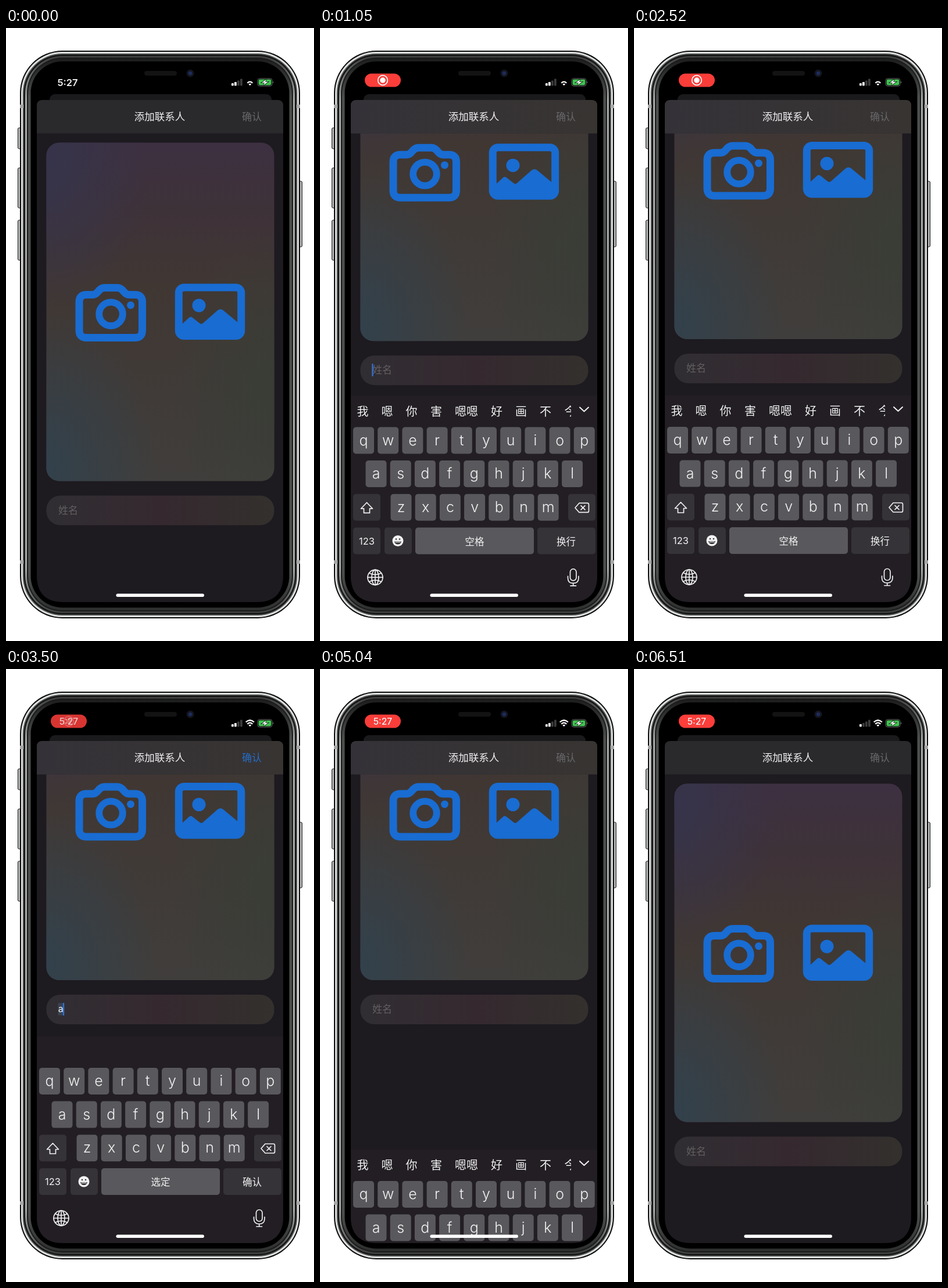
Write an HTML page that moves like this. It is 530 by 1056 pixels and loops after 6.58 s.

```html
<!DOCTYPE html>
<html lang="zh-CN">
<head>
<meta charset="utf-8">
<title>添加联系人</title>
<style>
html, body { margin: 0; width: 100%; height: 100%; overflow: hidden; background: #fff; }
svg { display: block; width: 530px; height: 1056px; }
text { font-family: Inter, "Noto Sans CJK SC", "Noto Sans CJK", sans-serif; fill: #f2f2f3; }
.line { fill: none; stroke: #f0f0f1; stroke-linecap: round; stroke-linejoin: round; }
.blue { fill: none; stroke: #196cd2; stroke-width: 13; stroke-linejoin: round; }
</style>
</head>
<body>
<svg viewBox="0 0 530 1056">
  <defs>
    <linearGradient id="steel" x2="0" y2="1">
      <stop offset="0" stop-color="#3a3c3b"/><stop offset=".08" stop-color="#a9acaa"/>
      <stop offset=".92" stop-color="#a9acaa"/><stop offset="1" stop-color="#3a3c3b"/>
    </linearGradient>
    <linearGradient id="rim" x2="0" y2="1">
      <stop offset="0" stop-color="#1c1d1d"/><stop offset=".07" stop-color="#4c4f4d"/>
      <stop offset=".93" stop-color="#4c4f4d"/><stop offset="1" stop-color="#2d2f2e"/>
    </linearGradient>
    <linearGradient id="base" x2="0" y2="1">
      <stop offset="0" stop-color="#3d3041"/><stop offset=".2" stop-color="#3e3239"/>
      <stop offset=".42" stop-color="#403733"/><stop offset="1" stop-color="#403e3c"/>
    </linearGradient>
    <radialGradient id="violet" cx="0" cy=".06" r=".45">
      <stop offset="0" stop-color="#36344b"/><stop offset="1" stop-color="#36344b" stop-opacity="0"/>
    </radialGradient>
    <radialGradient id="teal" cx="0" cy=".96" r=".48">
      <stop offset="0" stop-color="#32414c"/><stop offset="1" stop-color="#32414c" stop-opacity="0"/>
    </radialGradient>
    <radialGradient id="moss" cx="1" cy=".72" r=".45">
      <stop offset="0" stop-color="#393d36"/><stop offset="1" stop-color="#393d36" stop-opacity="0"/>
    </radialGradient>
    <linearGradient id="field">
      <stop offset="0" stop-color="#302e33"/><stop offset=".5" stop-color="#35292f"/>
      <stop offset="1" stop-color="#33302d"/>
    </linearGradient>
    <linearGradient id="tint">
      <stop offset="0" stop-color="#343238"/><stop offset="1" stop-color="#383432"/>
    </linearGradient>
    <clipPath id="screen"><path d="M53 58H477V943Q477 989 431 989H99Q53 989 53 943Z"/></clipPath>
    <clipPath id="sheet"><rect x="53" y="150" width="424" height="840"/></clipPath>
    <clipPath id="words"><rect x="53" y="633" width="379" height="54"/></clipPath>
  </defs>

  <g id="phone"></g>

  <g clip-path="url(#screen)">
    <rect x="75" y="114" width="382" height="30" rx="9" fill="#1a1a1c"/>
    <path d="M53 134Q53 124 63 124H467Q477 124 477 134V989H53Z" fill="#1d1a20"/>
    <g clip-path="url(#sheet)"><g id="content">
      <g id="card"></g>
      <path class="blue" d="M138.500 459.500H149Q154 459.500 158 454.500Q163 447.500 170 447.500H191Q198 447.500 203 454.500Q207 459.500 212 459.500H222Q234.500 459.500 234.500 472V521Q234.500 533.500 222 533.500H138.500Q126 533.500 126 521V472Q126 459.500 138.500 459.500Z"/>
      <circle class="blue" cx="180.500" cy="492.700" r="20.300" style="stroke-width:11.800"/>
      <circle cx="214.500" cy="477.500" r="6.500" fill="#196cd2"/>
      <rect class="blue" x="297.300" y="447" width="107.400" height="83.500" rx="9"/>
      <circle cx="332" cy="478" r="11.500" fill="#196cd2"/>
      <path d="M302 511L315 499Q318 496.500 321 499L333 508.500Q336 511 339 508.500L364 486.500Q369 482.500 374 486.500L401 509V532H302Z" fill="#196cd2"/>
      <rect x="69.500" y="805.500" width="392" height="51" rx="24" fill="url(#field)"/>
      <g id="hint"></g>
      <g id="typed"><rect x="89.500" y="820" width="9.500" height="21" fill="#3b4350"/></g>
      <rect id="caret" y="819.500" width="2.200" height="22" rx="1" fill="#2b74e0"/>
    </g></g>
    <path d="M53 134Q53 124 63 124H467Q477 124 477 134V181.500H53Z" fill="#2a292c"/>
    <path id="shade" d="M53 134Q53 124 63 124H467Q477 124 477 134V181.500H53Z" fill="url(#tint)"/>
    <g id="title"></g>
    <g id="keyboard"></g>
    <rect x="189.500" y="974.500" width="151.500" height="5.500" rx="2.700" fill="#fff"/>
  </g>

  <rect x="238" y="74" width="56" height="8" rx="4" fill="#131313"/>
  <circle cx="317" cy="78" r="6.500" fill="#14161f"/><circle cx="317" cy="78" r="3.200" fill="#1d2c5c"/>
  <g id="clock"></g>
  <g id="pill">
    <rect id="red" x="77" y="78.500" width="62" height="23" rx="11.500" fill="#ff3f3b"/>
    <g id="rec"><circle cx="108" cy="90" r="8.300" fill="none" stroke="#fff" stroke-width="1.700"/><circle cx="108" cy="90" r="4.700" fill="#fff"/></g>
    <g id="pillTime"></g>
  </g>
  <g id="bars"></g>
  <g fill="none" stroke="#fff" stroke-width="2.200">
    <path id="arc" d="M412.700 91.500Q419.800 85 426.900 91.500"/>
    <path d="M415.300 94.700Q419.800 90.600 424.300 94.700"/>
    <path d="M417.300 96.600Q419.800 94.800 422.300 96.600L419.800 99.300Z" fill="#fff" stroke="none"/>
  </g>
  <rect x="433" y="87" width="25" height="13" rx="3.800" fill="none" stroke="#6b6b6d"/>
  <rect x="434.600" y="88.600" width="21.800" height="9.800" rx="2.400" fill="#41c552"/>
  <path d="M459.200 91.500Q461.500 93.500 459.200 95.500Z" fill="#777"/>
  <path d="M448 88.500L440 94.300H445L443 98.500L451 92.700H446Z" fill="#fff" stroke="#0c2410" stroke-width="1.600" paint-order="stroke"/>
</svg>
<script>
const $ = id => document.getElementById(id);
const add = (id, markup) => { $(id).innerHTML += markup; };
const rect = (x, y, w, h, r, fill, more = '') =>
  `<rect x="${x}" y="${y}" width="${w}" height="${h}" rx="${r}" fill="${fill}" ${more}/>`;
const text = (s, x, y, size, more = '') =>
  `<text x="${x}" y="${y}" dy=".37em" font-size="${size}" text-anchor="middle" ${more}>${s}</text>`;

// Phone body: side buttons, nested rims, antenna bands
for (const [x, y, h] of [[20.5, 172, 36], [20.5, 241, 69], [20.5, 331, 69], [503.5, 264, 113]])
  add('phone', rect(x, y, 6, h, 2, '#b4b7b5', 'stroke="#111"'));
const rims = [[0, '#0a0a0a'], [2, '#dcdfdd'], [5, '#4a4c4b'], [7, '#0e0e0e'],
  [9, 'url(#steel)'], [12, '#1a1a1a'], [14, 'url(#rim)'], [18.5, '#000']];
for (const [d, fill] of rims)
  add('phone', rect(24 + d, 39 + d, 482 - 2 * d, 978 - 2 * d, 73 - d, fill));
for (const y of [132, 917])
  for (const x of [24, 500]) add('phone', rect(x, y, 6, 6, 0, '#a4a7a5'));

for (const fill of ['base', 'violet', 'teal', 'moss'])
  add('card', rect(69.5, 197.5, 392, 583, 22, `url(#${fill})`));
add('hint', text('姓名', 107, 830.5, 17, 'style="fill:#625f61"'));
add('typed', text('a', 94.3, 830, 16));
add('title', text('添加联系人', 264.5, 152.5, 17.5, 'font-weight="500"') +
  text('确认', 423, 152.5, 17, 'id="done"'));
add('clock', text('5:27', 106, 94, 16.5, 'font-weight="600"'));
add('pillTime', text('5:27', 108, 90, 15.5, 'font-weight="500"'));
[4.5, 6.5, 9, 12].forEach((h, i) =>
  add('bars', rect(388 + i * 5, 99.5 - h, 3.8, h, 1, i < 2 ? '#fff' : '#3c3c3e', `id="bar${i}"`)));

// Keyboard at rest
const light = '#59585c', dark = '#353337';
const key = (x, y, w, fill, id = '') => rect(x, y, w, 46, 5, fill, id && `id="${id}"`);
let board = rect(53, 633, 424, 360, 0, '#221e23');
const words = [['我', 73.5], ['嗯', 115.5], ['你', 157.5], ['害', 200], ['嗯嗯', 252],
  ['好', 304], ['画', 346], ['不', 388], ['今', 430.5]];
board += '<g id="bar"><g clip-path="url(#words)">' +
  words.map(([s, x]) => text(s, x, 660, 20)).join('') +
  '</g><path class="line" stroke-width="2" d="M447 653L454.500 660L462 653"/></g>';
[['qwertyuiop', 57], ['asdfghjkl', 78.5], ['zxcvbnm', 121.5]].forEach(([row, x0], r) =>
  [...row].forEach((c, i) => {
    const x = x0 + i * 42.2, y = 687 + r * 57.6;
    board += key(x, y, 36, light) + text(c, x + 18, y + 22, 25, 'font-weight="300"');
  }));
board += key(57, 802.2, 47, dark) + key(427, 802.2, 47, dark) +
  key(57, 860, 47, dark) + key(111, 860, 47, dark) +
  key(164, 860, 204, light) + key(374, 860, 100, dark, 'enter') +
  text('123', 80.5, 883, 16.5) + text('空格', 266, 884, 16.5, 'id="space"') +
  text('换行', 423.5, 884, 16.5, 'id="enterText"') +
  `<g class="line" stroke-width="1.700">
    <path d="M80.500 817L90.500 827.500H85.500V835H75.500V827.500H70.500Z"/>
    <path d="M446 818H460Q462.500 818 462.500 820.500V831.500Q462.500 834 460 834H446L439 826ZM449 822.500L456 829.500M456 822.500L449 829.500"/>
    <circle cx="95" cy="946" r="13"/><ellipse cx="95" cy="946" rx="6" ry="13"/>
    <path d="M95 933V959M82 946H108M84.500 938.500Q95 944 105.500 938.500M84.500 953.500Q95 948 105.500 953.500"/>
    <rect x="430.500" y="931.500" width="10.500" height="20" rx="5.200"/>
    <path d="M426.500 944V947Q426.500 956 435.700 956Q445 956 445 947V944M435.700 956V960.500M431 960.500H440.500"/>
  </g>
  <circle cx="134" cy="883" r="9.500" fill="#f2f2f3"/>
  <path d="M128 884H140Q139 889 134 889Q129 889 128 884Z" fill="${dark}"/>
  <path d="M129.500 885.300H138.500" stroke="#f2f2f3" stroke-width="1.200"/>
  <circle cx="131" cy="880" r="1.300" fill="${dark}"/><circle cx="137" cy="880" r="1.300" fill="${dark}"/>`;
add('keyboard', board);

const LOOP = 6580, STEP = 70, TYPE = 3360, ERASE = 4250, RETURN = 4620, BLUR = 4940;
// Critically damped spring from 0 to 1
const spring = ms => {
  const x = Math.max(0, ms) * 0.0183;
  return 1 - Math.exp(-x) * (1 + x);
};
const show = (id, v) => $(id).setAttribute('opacity', +v);
const move = (id, y) => $(id).setAttribute('transform', `translate(0 ${y})`);

function draw(t) {
  const typing = t >= TYPE && t < ERASE;
  const scroll = 244.5 * (spring(t - 704) - spring(t - 5090));
  const lift = spring(t - 562) - spring(t - BLUR);
  move('content', -scroll);
  move('keyboard', 357 * (1 - lift));
  show('keyboard', lift > 0.002);
  show('shade', Math.min(1, scroll / 40));

  show('hint', !typing);
  show('typed', typing);
  show('bar', !typing);
  $('done').style.fill = typing ? '#246dc9' : '#68676a';
  $('space').textContent = typing ? '选定' : '空格';
  $('enterText').textContent = typing ? '确认' : '换行';
  $('enter').setAttribute('fill', t >= RETURN && t < 4830 ? '#545458' : dark);

  const blinkFrom = t >= ERASE ? ERASE : t >= TYPE ? TYPE : 780;
  show('caret', t >= 780 && t < BLUR && (t - blinkFrom) % 1060 < 530);
  $('caret').setAttribute('x', typing ? 98 : 89.3);

  const pill = t >= 280;
  const swap = Math.min(1, Math.max(0, (t - 3360) / 180));
  show('clock', !pill);
  show('pill', pill);
  show('red', 0.92 - 0.08 * Math.cos((t - 770) / 670 * 2 * Math.PI));
  show('rec', 1 - swap);
  show('pillTime', swap);
  show('arc', t >= 3400);
  $('bar1').setAttribute('fill', t < 6000 ? '#fff' : '#3c3c3e');
}

const start = performance.now();
function frame() {
  const t = (performance.now() - start) % LOOP;
  draw(Math.floor(t / STEP) * STEP);
  requestAnimationFrame(frame);
}
frame();
</script>
</body>
</html>
```
